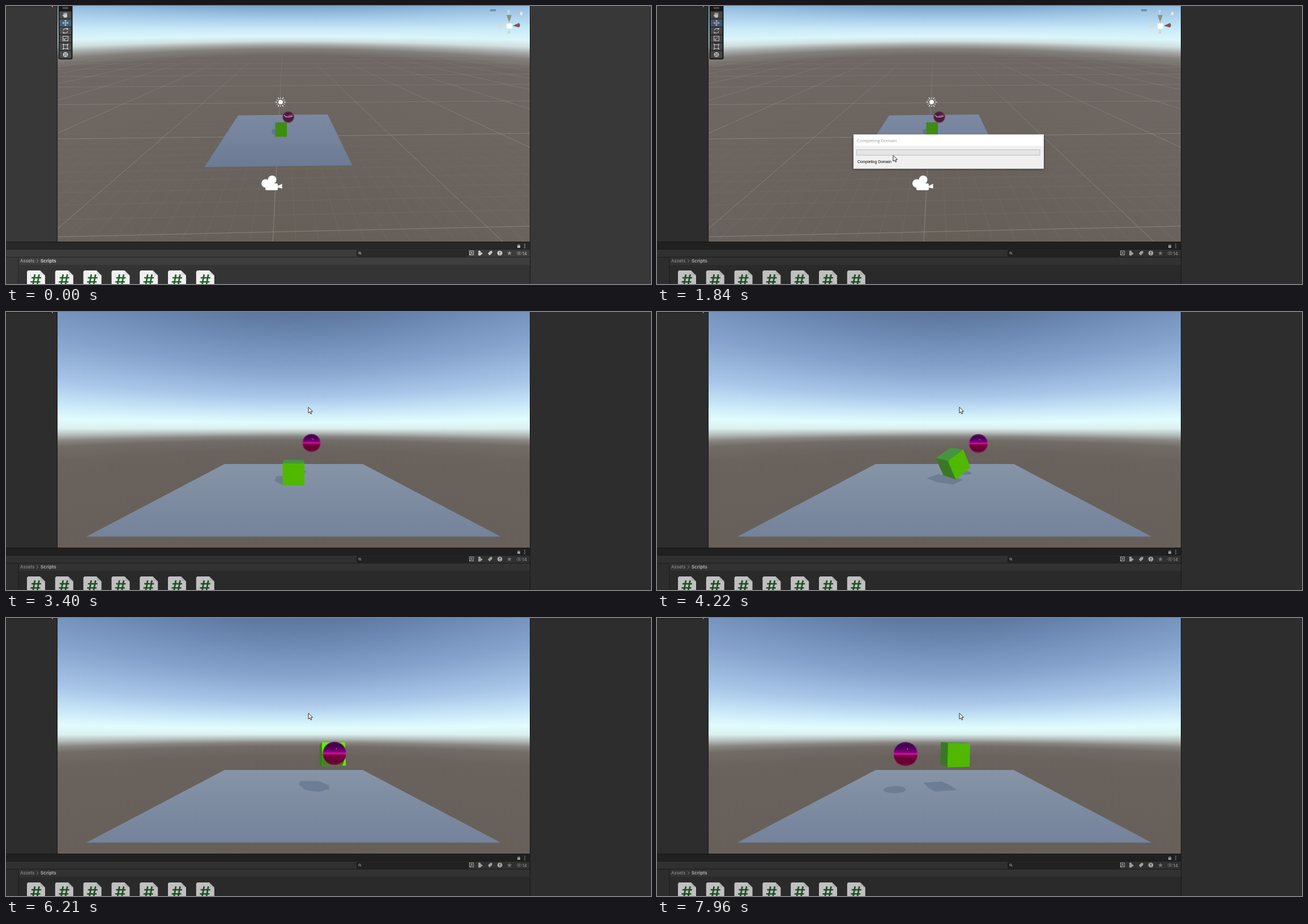
An HTML page with a canvas that plays this animation: 1139 px wide and 492 px high, repeating every 8000 ms.

```html
<!DOCTYPE html>
<html lang="en">
<head>
<meta charset="utf-8">
<title>Editor play mode</title>
<style>
html, body { margin: 0; width: 100%; height: 100%; overflow: hidden; background: #383838; }
canvas { display: block; }
</style>
</head>
<body>
<canvas id="stage" width="1139" height="492"></canvas>
<script>
const W = 1139, H = 492, LOOP = 8000;
const VIEW = { x: 91, y: 0, w: 834, h: 417 };
const stage = document.getElementById('stage').getContext('2d');
let g = stage;

// ---------- drawing helpers ----------
function rect(x, y, w, h, fill) { g.fillStyle = fill; g.fillRect(x, y, w, h); }
function round(x, y, w, h, r, fill) {
  g.beginPath(); g.roundRect(x, y, w, h, r); g.fillStyle = fill; g.fill();
}
function trace(pts, close) {
  g.beginPath();
  pts.forEach(([x, y], i) => i ? g.lineTo(x, y) : g.moveTo(x, y));
  if (close) g.closePath();
}
function poly(pts, fill) { trace(pts, true); g.fillStyle = fill; g.fill(); }
function line(pts, color, width = 1) {
  trace(pts); g.strokeStyle = color; g.lineWidth = width; g.stroke();
}
function disc(x, y, r, fill) { g.beginPath(); g.arc(x, y, r, 0, 7); g.fillStyle = fill; g.fill(); }
function ring(x, y, r, color, width = 1, a = 0, b = Math.PI * 2) {
  g.beginPath(); g.arc(x, y, r, a, b); g.strokeStyle = color; g.lineWidth = width; g.stroke();
}
function box(x, y, w, h, color) { g.strokeStyle = color; g.lineWidth = 1; g.strokeRect(x, y, w, h); }
function text(s, x, y, font, fill) { g.font = font; g.fillStyle = fill; g.fillText(s, x, y); }
function fade(y0, y1, stops) {
  const grad = g.createLinearGradient(0, y0, 0, y1);
  stops.forEach(([p, c]) => grad.addColorStop(p, c));
  return grad;
}
function layer(paint) {
  const c = document.createElement('canvas');
  c.width = W; c.height = H;
  g = c.getContext('2d');
  paint();
  g = stage;
  return c;
}

// Skybox: bands of equal elevation bend away from the horizon line.
function sky(cx, hy, stops) {
  const lo = stops[0][0], hi = stops[stops.length - 1][0];
  const bands = stops.map(([d, c]) => [(d - lo) / (hi - lo), c]);
  for (let x = VIEW.x; x < VIEW.x + VIEW.w; x += 2) {
    const s = Math.hypot(1, (x - cx) / F);
    rect(x, 0, 2, VIEW.h, fade(hy + lo * s, hy + hi * s, bands));
  }
}

// ---------- game camera ----------
const F = 366, CX = 507.7, HY = 205, FLOOR = -2.63;
const project = ([x, y, z]) => [CX + F * x / z, HY - F * y / z];
const add = (a, b, k = 1) => a.map((v, i) => v + b[i] * k);
const dot = (a, b) => a[0] * b[0] + a[1] * b[1] + a[2] * b[2];
const unit = a => a.map(v => v / Math.hypot(...a));
const cross = (a, b) => [a[1] * b[2] - a[2] * b[1], a[2] * b[0] - a[0] * b[2], a[0] * b[1] - a[1] * b[0]];
const TO_LIGHT = [0.321, 0.766, -0.557];
function dropShadow(p) {
  const h = p[1] - FLOOR;
  return [p[0] - 0.42 * h, FLOOR, p[2] + 0.727 * h];
}

// ---------- motion ----------
const BALL = [
  [3600, 0.98, -0.83, 11.3], [4220, 1.78, -0.83, 10.9], [4430, 2.07, -0.83, 10.75],
  [5020, 3.31, -0.83, 10.25], [5260, 3.5, -0.83, 9.95], [6210, 1.727, -0.83, 8.72],
  [6980, 0.39, -0.83, 8.45], [7960, -1.59, -0.83, 8.47]
];
const CUBE = [
  [3600, 0, -2.13, 10], [4220, 0.41, -1.68, 9.95], [5020, 1.02, -1.34, 10],
  [6210, 1.74, -0.95, 9.4], [6980, 1.42, -0.92, 9.25], [7960, 0.45, -0.89, 9.13]
];
const POINTER = [
  [1420, 520, 143], [1630, 450, 232], [1840, 416.5, 264], [1980, 394, 290],
  [2160, 490, 232], [2310, 616, 108], [2450, 552, 172], [2520, 533.5, 168]
];
// Smooth curve through timed keys.
function track(keys, t) {
  const last = keys.length - 1;
  if (t <= keys[0][0]) return keys[0].slice(1);
  if (t >= keys[last][0]) return keys[last].slice(1);
  let i = 0;
  while (t >= keys[i + 1][0]) i++;
  const slope = (n, k) => {
    const a = keys[Math.max(0, n - 1)], b = keys[Math.min(last, n + 1)];
    return (b[k] - a[k]) / (b[0] - a[0]);
  };
  const a = keys[i], b = keys[i + 1], d = b[0] - a[0], u = (t - a[0]) / d;
  return a.slice(1).map((v, j) => {
    const k = j + 1;
    return v + (b[k] - v) * u * u * (3 - 2 * u)
      + d * u * (1 - u) * ((1 - u) * slope(i, k) - u * slope(i + 1, k));
  });
}
const STARTS = [0, 130, 670, 870, 1630, 2450, 3070, 3400, 3670, 4220, 5020];
function stepTime(t) {
  const s = STARTS.filter(v => v <= t).pop();
  return s + 70 * Math.floor((t - s) / 70);
}

// ---------- scene view ----------
function ground(X, n) {
  const s = 0.027, d = 1.08 + n + s * X;
  return [501 + 418 * (X - s * n - 0.075) / d, 48 + 380 / d];
}
function grid(step, reach, far, color) {
  for (let X = -reach; X <= reach + 1e-6; X += step) line([ground(X, -0.45), ground(X, far)], color);
  for (let n = -0.4 + (step < 1 ? 0 : 0.4); n <= far; n += step)
    line([ground(-reach, n), ground(reach, n)], color);
}
function gizmo() {
  poly([[884, 16], [893, 16], [888.5, 29]], '#8b9479');
  poly([[895, 35], [906, 30], [908, 34], [906, 38]], '#7d5557');
  poly([[869, 32], [869, 39], [882, 35.5]], '#d6dcd3');
  poly([[885, 49], [891, 49], [888.5, 40]], '#cfd6d0');
  rect(884, 31, 10, 9, '#fbfdfd');
  text('y', 885.5, 12, '8px Inter, sans-serif', '#f4fafc');
  text('x', 907.5, 37, '7px Inter, sans-serif', '#d8dedb');
  rect(908, 12, 4, 4, '#e4eef4');
  ring(910, 12, 1.5, '#e4eef4', 1, Math.PI, 0);
  text('< Persp', 872, 71, '8px Inter, sans-serif', 'rgba(225,230,228,.3)');
  rect(855, 6, 10, 1, '#4c6175');
  rect(855, 8, 10, 1, '#4c6175');
}
function sceneView() {
  sky(500, 42, [[-42, '#7ba2cc'], [-20, '#a5cae8'], [0, '#caebf8'], [12, '#dcf6fa'], [20, '#cfdfdf'],
    [27, '#a5a9a6'], [34, '#827f7b'], [46, '#6e6763'], [375, '#665f58']]);
  g.save();
  g.beginPath(); g.rect(VIEW.x, VIEW.y, VIEW.w, VIEW.h); g.clip();
  grid(0.1, 3, 2.2, fade(140, 417, [[0, 'rgba(150,150,148,0)'], [1, 'rgba(150,150,148,.17)']]));
  grid(1, 16, 14, fade(76, 230, [[0, 'rgba(165,165,163,0)'], [0.3, 'rgba(165,165,163,.22)'], [1, 'rgba(165,165,163,.42)']]));
  g.restore();

  poly([[410, 193.5], [568, 192], [611.5, 282], [350.5, 285]], fade(192, 285, [[0, '#7c89a2'], [1, '#6c7b94']]));
  poly([[469, 219], [476, 217], [476, 229], [470, 226]], '#64738b');
  rect(475.5, 206, 20.5, 25.5, '#3d8d10');
  rect(475.5, 206, 20.5, 3, '#42861f');

  disc(498.5, 196.5, 10.3, '#501a3c');
  ring(498.5, 196.5, 9.8, '#77576b', 0.9);
  line([[491, 193], [494, 196], [499, 196.5], [506, 195]], '#b8a4b0', 1.4);
  line([[498, 194], [506, 193]], '#95798b');

  disc(485, 170, 4, '#ffffff');
  for (let a = 0; a < 12; a++) {
    const c = Math.cos(a * Math.PI / 6), s = Math.sin(a * Math.PI / 6), r = a % 2 ? 8 : 9.5;
    line([[485 + 6 * c, 170 + 6 * s], [485 + r * c, 170 + r * s]], '#f4f4f2', 1.3);
  }
  disc(458.5, 314, 7.5, '#ffffff');
  disc(470, 307.5, 7.5, '#ffffff');
  round(458, 314, 22, 12, 2, '#ffffff');
  poly([[479, 319], [487.5, 314.5], [487.5, 323], [479, 321]], '#ffffff');
  gizmo();
}

function toolStrip(playing) {
  round(92.5, -4, 25, 98.5, 3, '#191919');
  rect(100, 2, 10, 1, '#777');
  rect(100, 4, 10, 1, '#777');
  for (let i = 0; i < 6; i++) rect(94.5, 9.5 + 14 * i, 21, 13, i === 1 ? '#46607c' : '#4d4d4d');
  const c = '#d0d0d0';
  round(101.5, 15, 6.5, 5.5, 2, c);
  for (let i = 0; i < 4; i++) rect(101.5 + 1.8 * i, 11.5 + Math.abs(i - 1.5) * 0.6, 1.2, 5, c);
  line([[100, 16], [102.5, 18.5]], c, 1.3);
  const arrows = (x, y, r) => {
    line([[x - r, y], [x + r, y]], c);
    line([[x, y - r], [x, y + r]], c);
    for (const [a, b] of [[1, 0], [-1, 0], [0, 1], [0, -1]])
      poly([[x + a * (r + 1), y + b * (r + 1)], [x + a * (r - 1.5) + b * 2, y + b * (r - 1.5) + a * 2],
        [x + a * (r - 1.5) - b * 2, y + b * (r - 1.5) - a * 2]], c);
  };
  arrows(105, 30, 4.5);
  ring(105, 44, 4, c, 1.1, 0.2, 2.5);
  ring(105, 44, 4, c, 1.1, 3.4, 5.7);
  poly([[107, 39], [110, 39], [109, 43]], c);
  poly([[100, 45], [101, 49], [103, 48]], c);
  box(100.5, 53.5, 9, 8, c);
  box(100.5, 58.5, 3, 3, c);
  line([[103.5, 59], [107.5, 55.5]], c);
  box(101.5, 68.5, 7, 7, c);
  for (const x of [100, 108]) for (const y of [67, 75]) rect(x, y, 2, 2, c);
  ring(105, 86, 4, c);
  arrows(105, 86, 3.5);
  if (playing) rect(92.5, 0, 25, 94.5, 'rgba(0,0,0,.1)');
}

// ---------- editor chrome ----------
function scriptIcon(x) {
  poly([[x + 2, 468], [x + 23, 468], [x + 32, 477], [x + 32, H], [x, H], [x, 470]], '#f0f0f0');
  poly([[x + 23, 468], [x + 32, 477], [x + 24, 476]], '#dcdcdc');
  const ink = '#206229';
  line([[x + 14, 475], [x + 10.5, 494]], ink, 2.7);
  line([[x + 21.5, 475], [x + 18, 494]], ink, 2.7);
  line([[x + 8, 481], [x + 25, 481]], ink, 2.5);
  line([[x + 6.5, 488.3], [x + 23.5, 488.3]], ink, 2.5);
}
function searchBar() {
  round(619, 432, 198, 11.5, 3, '#212121');
  round(620, 432.8, 196, 10, 3, '#2a2a2a');
  ring(624.5, 437, 1.7, '#c4c4c4');
  line([[625.7, 438.2], [627.5, 440]], '#c4c4c4');
  const c = '#c8c8c8';
  box(818.5, 433.5, 7, 7, c);
  line([[818, 441], [823, 436]], c);
  line([[820, 436], [823, 436], [823, 439]], c);
  disc(836, 435, 2.2, c);
  rect(834, 437, 4, 4.5, c);
  poly([[838, 435], [842, 438], [838, 441]], c);
  poly([[851, 438], [855, 433.5], [858.5, 433.5], [858.5, 437], [854, 441.5]], c);
  disc(872, 437.3, 4.3, '#d2d2d2');
  rect(871.4, 434.5, 1.3, 3.6, '#333');
  rect(871.4, 439, 1.3, 1.3, '#333');
  poly(Array.from({ length: 10 }, (_, i) => {
    const r = i % 2 ? 1.9 : 4.6, a = i * Math.PI / 5;
    return [889 + r * Math.sin(a), 437.5 - r * Math.cos(a)];
  }), '#8e8e8e');
  g.beginPath(); g.ellipse(906, 437.5, 4, 2.6, 0, 0, 7);
  g.strokeStyle = '#858585'; g.lineWidth = 1; g.stroke();
  disc(906, 437.5, 1.4, '#858585');
  text('14', 911.5, 440.7, '8px Inter, sans-serif', '#c4c4c4');
}
function chrome(playing) {
  rect(0, 0, W, H, '#383838');
  rect(0, 0, 90, 1.5, '#2b2b2b');
  rect(81, 0, 1.5, 2, '#c0c0c0');
  rect(0, 417, 925, 14, '#282828');
  rect(0, 431, 925, 13.5, '#3c3c3c');
  rect(0, 430, 925, 1, '#202020');
  rect(0, 444, 925, 1, '#232323');
  rect(22, 445, 903, 13, '#3e3e3e');
  rect(22, 458, 903, 34, '#343434');
  rect(21.5, 445, 1, 47, '#222');
  rect(903, 424, 5, 4, '#c0c0c0');
  ring(905.5, 424, 1.7, '#c0c0c0', 1, Math.PI, 0.3);
  for (const y of [421, 424, 427]) rect(915.3, y, 1.5, 1.5, '#c0c0c0');
  searchBar();
  text('Assets', 25, 454, '8px Inter, sans-serif', '#c0c0c0');
  line([[54, 448.5], [57, 451.2], [54, 454]], '#a0a0a0');
  text('Scripts', 61, 454, 'bold 8px Inter, sans-serif', '#d0d0d0');
  for (let i = 0; i < 7; i++) scriptIcon(37 + 49.8 * i);
  if (playing) rect(0, 0, W, H, 'rgba(0,0,0,.2)');
  rect(90, 0, 1, 418, '#161616');
  rect(925, 0, 1, H, '#161616');
  rect(0, 417, 925, 1, '#161616');
}

// ---------- game view ----------
const FLOOR_QUAD = [[386, 269], [630, 269], [873.5, 397.5], [142, 397.5]];
function gameBackdrop() {
  sky(CX, HY, [[-205, '#5c769c'], [-155, '#6d8bb5'], [-105, '#84a2cb'], [-55, '#a8c6e8'], [-26, '#cbe9f8'],
    [-10, '#e2fcfd'], [1, '#d9f0ef'], [9, '#b2b9b6'], [15, '#898783'], [22, '#726c68'],
    [40, '#69625d'], [212, '#665f58']]);
  poly(FLOOR_QUAD, fade(269, 397, [[0, '#8694a7'], [1, '#74839b']]));
}
function cubeFaces(c, target, turned) {
  const f = turned ? unit(add(target, c, -1)) : [0, 0, 1];
  const r = unit([f[2], 0, -f[0]]), u = cross(f, r);
  const axes = [r, u, f], faces = [];
  for (let i = 0; i < 3; i++) for (const s of [-0.5, 0.5]) {
    const mid = add(c, axes[i], s), p = axes[(i + 1) % 3], q = axes[(i + 2) % 3];
    const pts = [[-1, -1], [1, -1], [1, 1], [-1, 1]].map(([a, b]) => add(add(mid, p, a / 2), q, b / 2));
    faces.push({ mid, pts, n: axes[i].map(v => v * s * 2) });
  }
  return faces;
}
function faceColor(n) {
  if (n[1] > 0.6) return '#45953f';
  const k = Math.min(1, Math.max(0, dot(n, TO_LIGHT) / 0.55));
  const mix = (a, b) => Math.round(a + (b - a) * k);
  return `rgb(${mix(58, 80)},${mix(120, 184)},${mix(38, 0)})`;
}
function drawCube(faces, c, ball) {
  const [bx, by] = project(ball), scale = F / ball[2];
  const shaded = ball[2] < c[2] - 0.2 && Math.abs(ball[0] - c[0]) < 1.1;
  for (const { mid, pts, n } of faces) {
    if (dot(n, mid) >= 0) continue;
    const flat = pts.map(project);
    poly(flat, shaded && n[2] < -0.97 ? '#6ce800' : faceColor(n));
    if (shaded && n[2] < -0.5) {
      g.save();
      trace(flat, true); g.clip();
      disc(bx - 0.1 * scale, by + 0.25 * scale, scale / 2, '#3c8a16');
      g.restore();
    }
  }
}
function drawBall(p) {
  const [x, y] = project(p), r = F * 0.5 / p[2];
  disc(x, y, r, fade(y - r, y + r, [[0, '#52105a'], [0.15, '#45014c'], [0.32, '#5e0064'], [0.44, '#94007f'],
    [0.49, '#d514a4'], [0.53, '#a80470'], [0.58, '#74003c'], [0.85, '#640030'], [1, '#721a40']]));
  ring(x, y, r - 0.5, 'rgba(150,110,160,.55)', 0.9);
  disc(x + r * 0.15, y - r * 0.4, 0.9, '#c47cc8');
}
function gameView(t) {
  const ball = track(BALL, t), c = track(CUBE, t);
  const faces = cubeFaces(c, ball, t >= 3670);
  const spot = dropShadow(ball);
  const oval = Array.from({ length: 28 }, (_, i) => {
    const a = i * Math.PI / 14, p = 0.5 * Math.cos(a), q = 0.653 * Math.sin(a);
    return project([spot[0] + 0.866 * p - 0.5 * q, FLOOR, spot[2] + 0.5 * p + 0.866 * q]);
  });
  g.save();
  trace(FLOOR_QUAD, true); g.clip();
  poly(oval, '#6c7d94');
  for (const { pts } of faces) poly(pts.map(p => project(dropShadow(p))), '#6c7d94');
  g.restore();
  if (ball[2] > c[2]) { drawBall(ball); drawCube(faces, c, ball); }
  else { drawCube(faces, c, ball); drawBall(ball); }
}

// ---------- overlays ----------
function dialog(alpha, zoom) {
  g.save();
  g.globalAlpha = alpha;
  g.translate(515, 257.5); g.scale(zoom, zoom); g.translate(-515, -257.5);
  g.shadowColor = 'rgba(0,0,0,.45)'; g.shadowBlur = 5; g.shadowOffsetY = 1;
  rect(347, 227.5, 336, 60.5, '#f0f0f0');
  g.shadowColor = 'transparent';
  rect(347, 227.5, 336, 20, '#ffffff');
  rect(352, 254, 324.5, 10.5, '#bcbcbc');
  rect(353, 255, 322.5, 8.5, '#e6e6e6');
  text('Completing Domain', 353, 240.5, '7.6px "Open Sans", sans-serif', '#979797');
  text('Completing Domain', 354, 278, '6.8px "Liberation Sans", Arial, sans-serif', '#000');
  g.restore();
}
function pointer(x, y) {
  trace([[0.5, 0.5], [0.5, 10.8], [2.9, 8.6], [4.6, 12.4], [6.3, 11.6], [4.7, 8], [8, 7.8]]
    .map(([a, b]) => [x + a, y + b]), true);
  g.fillStyle = '#fff'; g.fill();
  g.strokeStyle = '#111'; g.lineWidth = 0.9; g.stroke();
}

// ---------- playback ----------
const editor = [false, true].map(on => layer(() => { chrome(on); sceneView(); toolStrip(on); }));
const game = layer(() => {
  chrome(true);
  g.save();
  g.beginPath(); g.rect(VIEW.x, VIEW.y, VIEW.w, VIEW.h); g.clip();
  gameBackdrop();
  g.restore();
});

function draw(t) {
  if (t < 3400) {
    g.drawImage(editor[t < 670 ? 0 : 1], 0, 0);
    if (t >= 870) {
      const show = Math.min(1, (t - 800) / 210);
      const hide = Math.min(1, Math.max(0, (t - 2860) / 190));
      if (hide < 1) dialog(show * (1 - hide), 0.955 + 0.045 * Math.min(show, 1 - hide));
      else rect(354, 229, 320, 57, 'rgba(140,120,112,.12)');
    }
  } else {
    g.drawImage(game, 0, 0);
    gameView(t);
  }
  if (t >= 130 && t < 200) pointer(841, 201);
  if (t >= 1420) pointer(...track(POINTER, t));
}
function tick(now) {
  draw(stepTime(now % LOOP));
  requestAnimationFrame(tick);
}
requestAnimationFrame(tick);
</script>
</body>
</html>
```
